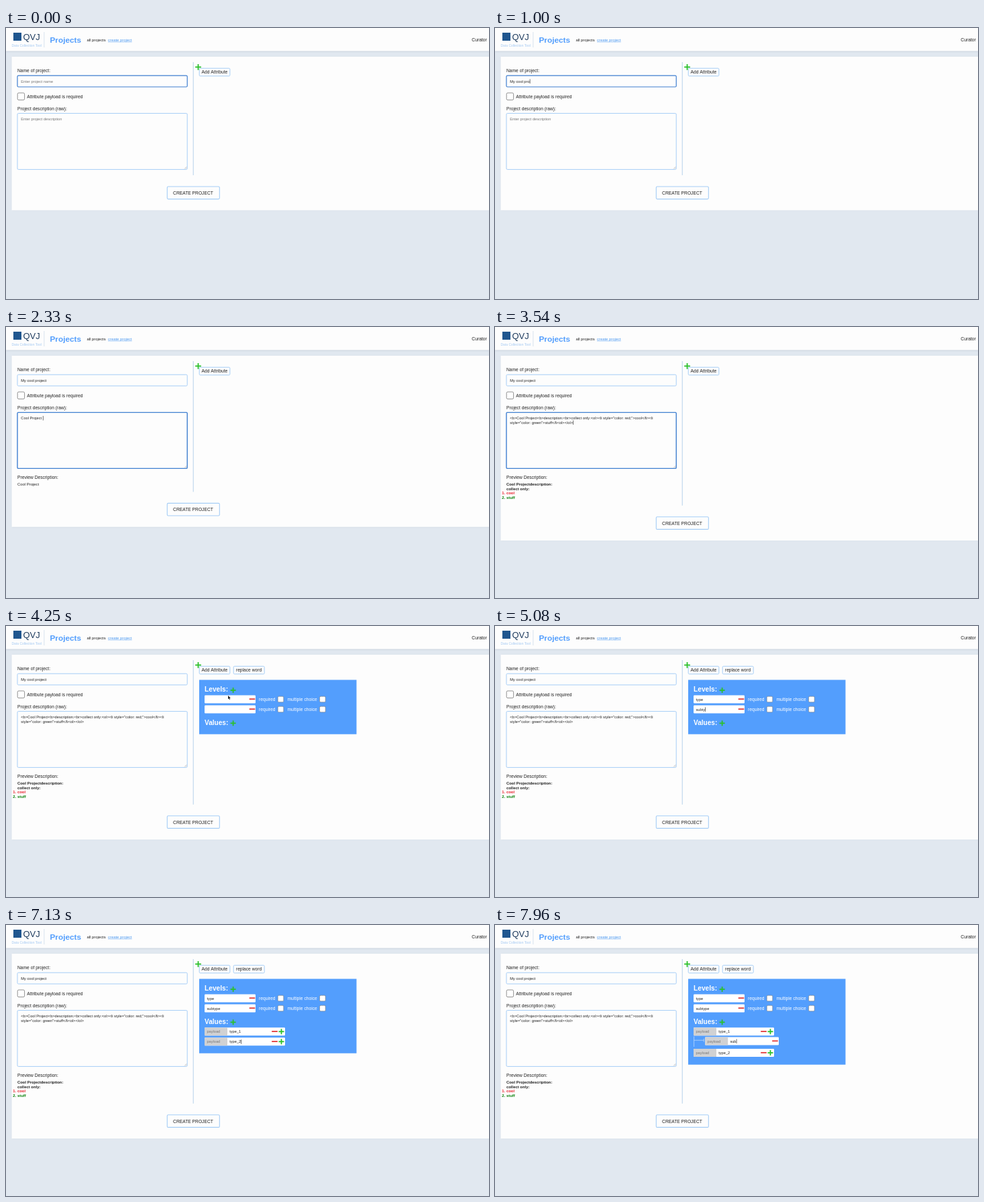
Recreate the animation shown at these times as an HTML page with a canvas. Size 720 by 405 pixels, loop 8000 ms.

```html
<!DOCTYPE html>
<html lang="en">
<head>
<meta charset="utf-8">
<title>Create project</title>
<style>
html, body { margin: 0; width: 100%; height: 100%; overflow: hidden; background: #e1e8f0; }
canvas { display: block; width: 720px; height: 405px; }
</style>
</head>
<body>
<canvas id="stage"></canvas>
<script>
const LOOP = 8000;
const canvas = document.getElementById('stage');
const ctx = canvas.getContext('2d');
const dpr = window.devicePixelRatio || 1;
canvas.width = 720 * dpr;
canvas.height = 405 * dpr;

const INK = '#222', BLUE = '#539efd', PALE = '#a5cdf6', FOCUS = '#3f7fd0';
const GREEN = '#2cc02c', RED = '#e23a3a', PAPER = '#fdfdfd';
const SMALL = 5.66, LABEL = 6.7, PREVIEW = 5.9;

const MARKUP = [
  '<b>Cool Project<b>description:<br>collect only:<ol><li style="color: red;">cool</li><li',
  'style="color: green">stuff</li<ol></ol>'
];

// Moments of the interaction, in ms
const AT = {
  descFocus: 1140, paste: 2450, addAttr: 3760, level1: 3980, level2: 4150,
  field1: 4340, field2: 4720, value1: 5480, valueFocus1: 5680,
  value2: 6680, valueFocus2: 6820, child: 7540, childFocus: 7690
};
const CARET_OFF = [[170, 420], [1500, 1580], [2830, 3040], [3210, 3380]];

// Pointer journeys: points are [time, x, y]; hidden in between
const JOURNEYS = [
  [[3560, 250, 150], [3700, 311, 66], [3790, 311, 66], [3930, 339, 96], [4180, 339, 96], [4310, 325, 110], [4400, 325, 110]],
  [[5230, 325, 124], [5400, 339, 145], [5500, 339, 145], [5640, 360, 159], [5700, 360, 159], [5960, 568, 202],
   [6500, 568, 202], [6640, 339, 145], [6700, 339, 145], [6800, 360, 174], [6880, 360, 174]],
  [[7380, 360, 174], [7500, 410, 160], [7560, 410, 160], [7670, 375, 174], [7790, 375, 174]]
];

function typed(str, t, start, step) {
  return t < start ? '' : str.slice(0, Math.floor((t - start) / step) + 1);
}

function text(str, x, y, size, color = INK, bold = false) {
  ctx.font = `${bold ? 'bold ' : ''}${size}px "Liberation Sans", Arial, sans-serif`;
  ctx.fillStyle = color;
  ctx.fillText(str, x, y);
  return x + ctx.measureText(str).width;
}

function rect(x, y, w, h, color) {
  ctx.fillStyle = color;
  ctx.fillRect(x, y, w, h);
}

function box(x, y, w, h, r, fill, stroke, line = 1) {
  ctx.beginPath();
  ctx.roundRect(x, y, w, h, r);
  ctx.fillStyle = fill;
  ctx.fill();
  if (!stroke) return;
  ctx.strokeStyle = stroke;
  ctx.lineWidth = line;
  ctx.stroke();
}

function plus(x, y, r = 4, color = GREEN) {
  rect(x - r, y - 0.9, r * 2, 1.8, color);
  rect(x - 0.9, y - r, 1.8, r * 2, color);
}

function minus(x, y) {
  rect(x - 4.3, y - 0.9, 8.6, 1.8, RED);
}

function caret(x, y, t) {
  if (CARET_OFF.some(([a, b]) => t >= a && t < b)) return;
  rect(x + 0.2, y - 5.2, 0.7, 6.6, '#333');
}

function header() {
  ctx.save();
  ctx.shadowColor = 'rgba(60,80,110,.28)';
  ctx.shadowBlur = 3 * dpr;
  ctx.shadowOffsetY = 0.5 * dpr;
  rect(0, 0, 720, 34.5, PAPER);
  ctx.restore();
  rect(11, 7, 12, 12, '#1f568f');
  text('QVJ', 25.5, 17.8, 13, '#1f3c5e');
  text('Data Collection Tool', 8.5, 28.4, 5, '#a3c8f2');
  rect(56.5, 6, 0.8, 23, '#cfdeec');
  text('Projects', 65.5, 21.6, 11.8, BLUE, true);
  text('all projects', 120.5, 20, 5.9);
  const end = text('create project', 152, 20, 5.9, '#4b98f0');
  rect(152, 20.7, end - 152, 0.5, '#4b98f0');
  text('Curator', 694.3, 20.2, 6.75);
}

function nameField(t) {
  const on = t < AT.descFocus;
  text('Name of project:', 17, 66.1, LABEL);
  box(17, 71.2, 253.2, 16.8, 1.5, PAPER, on ? FOCUS : PALE, on ? 1.2 : 1);
  const name = typed('M', t, 40, 1) + typed('y', t, 420, 1) + typed(' cool project', t, 710, 33);
  const end = text(name || 'Enter project name', 22.3, 81.6, SMALL, name ? INK : '#757575');
  if (on && name) caret(end, 81.6, t);
  box(17.2, 97, 10.4, 10.6, 1.8, '#fff', '#777', 0.8);
  text('Attribute payload is required', 31.2, 104.7, LABEL);
}

function description(t) {
  const on = t >= AT.descFocus && t < AT.addAttr;
  text('Project description (raw):', 17, 122.5, LABEL);
  box(17, 127.6, 253.2, 83.8, 1.5, PAPER, on ? FOCUS : PALE, on ? 1.4 : 1);
  ctx.strokeStyle = '#999';
  ctx.lineWidth = 0.5;
  ctx.beginPath();
  for (const d of [3.2, 1.6]) {
    ctx.moveTo(269.3 - d, 210.4);
    ctx.lineTo(269.3, 210.4 - d);
  }
  ctx.stroke();

  const plain = typed('Cool ', t, 1170, 38) + typed('Project ', t, 1750, 60);
  const rich = t >= AT.paste;
  const lines = rich ? MARKUP : [plain || 'Enter project description'];
  let end, y;
  lines.forEach((s, i) => {
    y = 138.1 + i * 6.6;
    end = text(s, 22.3, y, SMALL, plain ? INK : '#757575');
  });
  if (on) caret(plain ? end : 22.3, y, t);

  if (!plain) return;
  text('Preview Description:', 17, 226.5, LABEL);
  if (!rich) {
    text(plain, 17, 236.9, PREVIEW);
    return;
  }
  text('Cool Projectdescription:', 17, 236.9, PREVIEW, INK, true);
  text('collect only:', 17, 243.5, PREVIEW, INK, true);
  [['cool', '#e8202c'], ['stuff', '#0b800b']].forEach(([word, color], i) => {
    const base = 250.2 + i * 6.7;
    text(`${i + 1}.`, 10.2, base, PREVIEW, color, true);
    text(word, 17, base, PREVIEW, color, true);
  });
}

function levelRow(y, value, active, t) {
  box(296, y - 6, 76, 12, 1.2, '#fff');
  const end = text(value, 299.5, y + 2.1, SMALL);
  if (active) caret(end, y + 2.1, t);
  minus(367, y - 0.3);
  text('required', 377, y + 2.5, LABEL, '#fff');
  text('multiple choice', 419.5, y + 2.5, LABEL, '#fff');
  for (const x of [405.2, 467.6]) box(x, y - 4.3, 8.6, 8.6, 1.6, '#fff', '#777', 0.6);
}

function valueRow(x, y, w, value, active, t, nested) {
  box(x, y - 6, w, 12, 1.2, '#fff');
  rect(x, y - 6, 34, 12, '#d0d1d3');
  text('payload', x + 3.4, y + 2.1, SMALL, '#777');
  const end = text(value, x + 37.2, y + 2.1, SMALL);
  if (active) caret(end, y + 2.1, t);
  const right = x + w;
  minus(right - (nested ? 5.5 : 15.5), y - 0.2);
  if (!nested) plus(right - 5.5, y);
}

function attribute(t) {
  if (t < AT.addAttr) return;
  box(339.2, 60.2, 46, 11.6, 1.5, PAPER, PALE);
  text('replace word', 342.9, 68.3, LABEL);

  const levels = (t >= AT.level1) + (t >= AT.level2);
  const values = (t >= AT.value1) + (t >= AT.value2);
  const child = t >= AT.child;
  const top = 115 + levels * 15;
  rect(288, 80.5, 234.5, 51.2 + levels * 15 + values * 15 + (child ? 17 : 0), BLUE);

  text('Levels:', 296, 98.1, 10.2, '#fff', true);
  plus(338.6, 96);
  if (levels > 0) levelRow(109.5, typed('type', t, 4420, 60), t >= AT.field1 && t < AT.field2, t);
  if (levels > 1) levelRow(124.5, typed('subtype', t, 4800, 65), t >= AT.field2 && t < AT.value1, t);

  text('Values:', 296, top + 2.9, 10.1, '#fff', true);
  plus(338.6, top + 0.3);
  if (values > 0) valueRow(296, 159.3, 120, typed('type_1', t, 6060, 60), t >= AT.valueFocus1 && t < AT.value2, t);
  if (values > 1) {
    const y = child ? 191 : 174.3;
    valueRow(296, y, 120, typed('type_2', t, 6880, 50), t >= AT.valueFocus2 && t < AT.child, t);
  }
  if (child) {
    const line = '#b9d7fb';
    rect(296.3, 166.5, 0.8, 15.5, line);
    rect(296.3, 171.8, 15, 0.8, line);
    rect(310.8, 169.8, 0.8, 4.8, line);
    valueRow(313.2, 173.5, 109.8, typed('sub', t, 7800, 70), t >= AT.childFocus, t, true);
  }
}

function pointer(t) {
  const path = JOURNEYS.find(p => t >= p[0][0] && t < p[p.length - 1][0]);
  if (!path) return;
  const i = path.findIndex(p => t < p[0]);
  const [t0, x0, y0] = path[i - 1], [t1, x1, y1] = path[i];
  const k = (t - t0) / (t1 - t0), e = k * k * (3 - 2 * k);
  ctx.save();
  ctx.translate(x0 + (x1 - x0) * e, y0 + (y1 - y0) * e);
  ctx.beginPath();
  [[0, 0], [0, 5.4], [1.2, 4.3], [2.1, 6.3], [3, 5.9], [2.1, 4], [3.8, 3.9]].forEach(p => ctx.lineTo(...p));
  ctx.closePath();
  ctx.strokeStyle = '#fff';
  ctx.lineWidth = 0.9;
  ctx.stroke();
  ctx.fillStyle = '#222';
  ctx.fill();
  ctx.restore();
}

function draw(t) {
  ctx.setTransform(dpr, 0, 0, dpr, 0, 0);
  rect(0, 0, 720, 405, '#e1e8f0');
  const grow = t >= AT.paste ? 46.8 : t >= 1170 ? 26.4 : 0;
  ctx.save();
  ctx.shadowColor = 'rgba(60,80,110,.12)';
  ctx.shadowBlur = 2 * dpr;
  rect(8.5, 42.8, 720, 229.6 + grow, PAPER);
  ctx.restore();
  header();
  nameField(t);
  description(t);
  rect(278.7, 51, 1, 169 + grow, '#b5d2ea');
  box(240.3, 237 + grow, 78, 18.6, 1.5, PAPER, PALE, 1.1);
  text('CREATE PROJECT', 249.1, 248.7 + grow, 6.7);
  box(288.2, 60.2, 45.6, 11.6, 1.5, PAPER, PALE);
  text('Add Attribute', 291.6, 68.3, LABEL);
  plus(286.5, 58.4, 4.4);
  attribute(t);
  pointer(t);
}

const begin = performance.now();
function tick() {
  draw((performance.now() - begin) % LOOP);
  requestAnimationFrame(tick);
}
tick();
</script>
</body>
</html>
```
